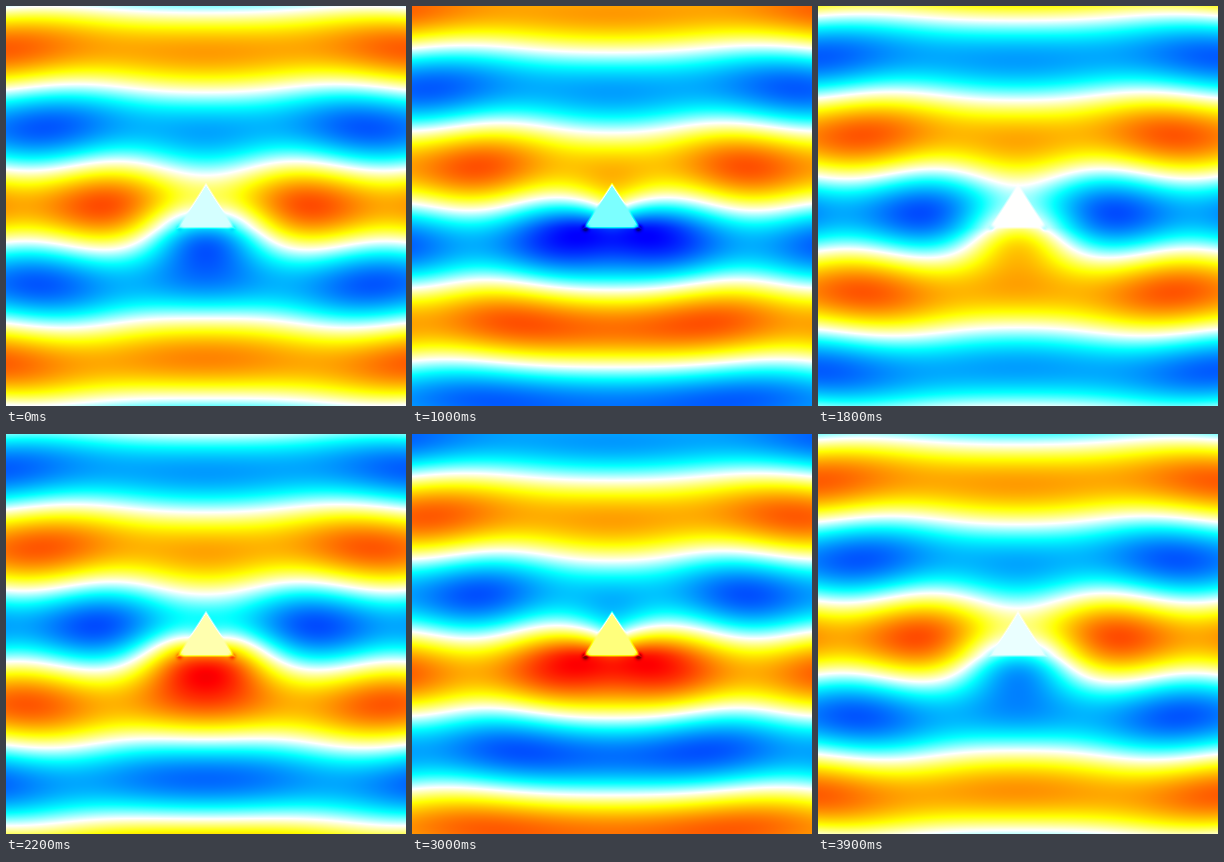
Animation, 400 px wide and 400 px high, one loop 4000 ms. Source, as a matplotlib script:

```python
import numpy as np
import matplotlib.pyplot as plt
from matplotlib.animation import FuncAnimation
from matplotlib.colors import LinearSegmentedColormap

SIZE = 400
FRAMES = 40
K = 2 * np.pi / 157          # wavenumber, rad per pixel
CX, CY = 200, 207            # scattering centre
APEX_Y, BASE_Y, HALF = 178, 222, 28


def cis(deg):
    return np.exp(1j * np.radians(deg))


def integrate(f, x):
    return ((f[:, 1:] + f[:, :-1]) / 2 * np.diff(x)).sum(axis=1)


def hankel0(x):
    """Outgoing cylindrical wave, from integral forms of J0 and Y0."""
    grid = np.linspace(0.2, 13, 500)
    th = np.linspace(0, np.pi, 300)
    t = np.linspace(0, 6, 900)
    phase = grid[:, None] * np.sin(th)
    j0 = integrate(np.cos(phase), th) / np.pi
    decay = np.exp(-grid[:, None] * np.sinh(t))
    y0 = integrate(np.sin(phase), th) / np.pi - 2 / np.pi * integrate(decay, t)
    return np.interp(x, grid, j0) + 1j * np.interp(x, grid, y0)


def build_field():
    """Complex amplitude of the total field around the prism."""
    y, x = np.mgrid[0:SIZE, 0:SIZE] + 0.5
    dx, dy = x - CX, y - BASE_Y

    incident = -np.exp(-1j * K * (y - 200))
    r = np.maximum(np.hypot(dx, y - CY), 10)
    scattered = -0.55 * hankel0(K * r) * cis(164)

    # near field hugging the base
    height = np.where(dy > 0, 31, 25)
    near = 1.14 * np.exp(-(dy / height) ** 2 - (dx / 57) ** 2)
    near = near * cis(42 - 1.1 * np.clip(dy, 0, 60))
    outside = incident + scattered + near

    # weak, nearly uniform field inside, with a soft edge
    rise = BASE_Y - APEX_Y
    side = ((y - APEX_Y) * HALF - np.abs(dx) * rise) / np.hypot(HALF, rise)
    depth = np.minimum(side, BASE_Y - y)
    mask = np.clip(depth / 2.4 + 0.5, 0, 1)
    field = outside * (1 - mask) + 0.27 * cis(72) * mask

    # hot spots at the base corners
    d2 = (np.abs(dx) - HALF + 1.5) ** 2 + (dy - 0.3) ** 2
    return field + 0.9 * cis(80) * np.exp(-d2 / 9)


field = build_field()
cmap = LinearSegmentedColormap.from_list("wave", [
    (0, (0, 0, 0.5)), (0.125, (0, 0, 1)), (0.375, (0, 1, 1)),
    (0.5, (1, 1, 1)),
    (0.625, (1, 1, 0)), (0.875, (1, 0, 0)), (1, (0.5, 0, 0)),
], N=1024)


def wave(i):
    return -np.real(field * np.exp(-2j * np.pi * i / FRAMES))


fig = plt.figure(figsize=(4, 4), dpi=100)
ax = fig.add_axes([0, 0, 1, 1])
ax.axis("off")
image = ax.imshow(wave(0), cmap=cmap, vmin=-2, vmax=2,
                  interpolation="nearest", aspect="auto")


def update(i):
    image.set_data(wave(i))
    return [image]


anim = FuncAnimation(fig, update, frames=FRAMES, interval=100,
                     repeat=True, repeat_delay=0)
plt.show()
```
